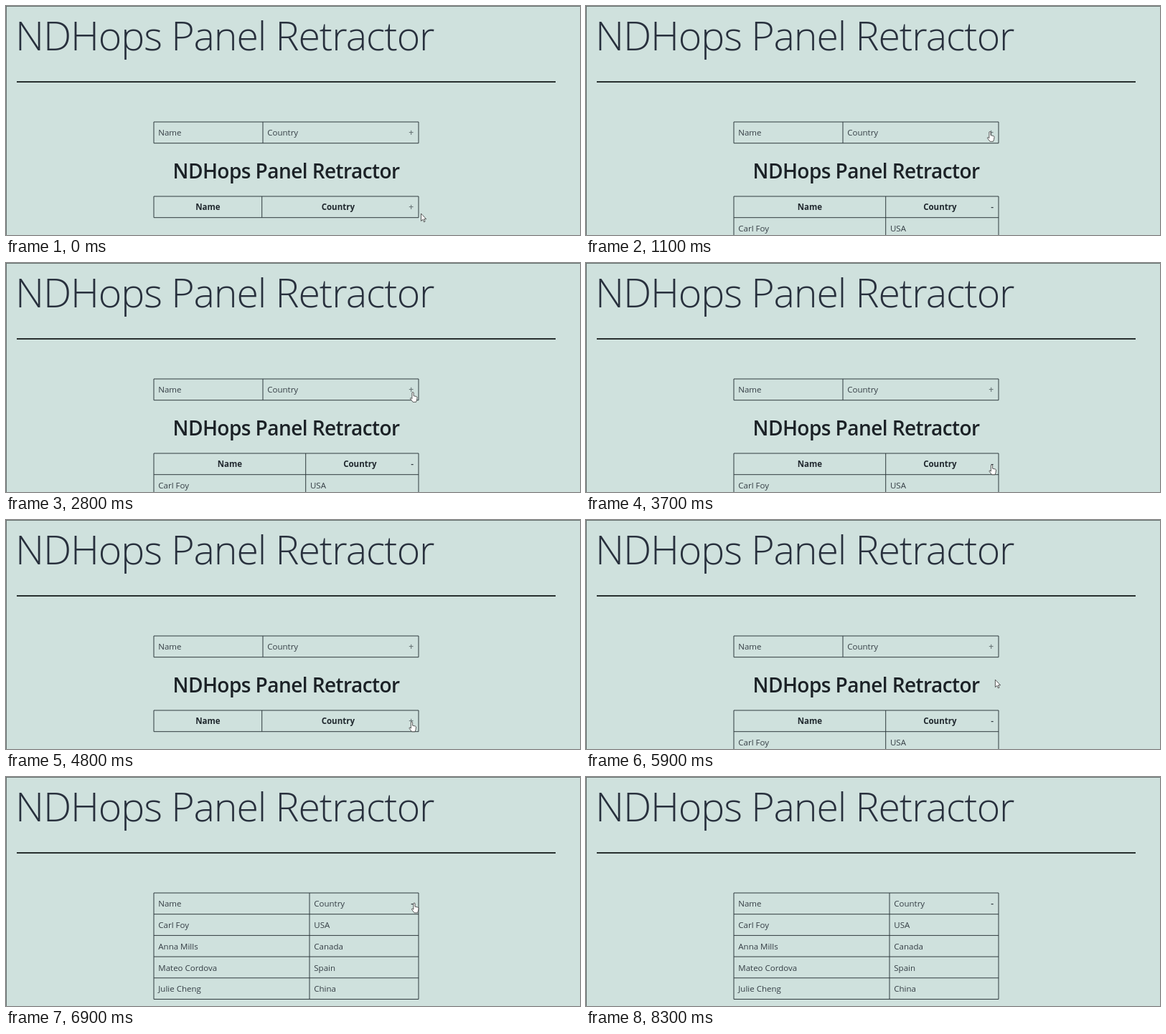
Animation, 800 px wide and 320 px high, one loop 9100 ms. Source, as an HTML page:

```html
<!DOCTYPE html>
<html lang="en">
<head>
<meta charset="utf-8">
<title>NDHops Panel Retractor</title>
<style>
  html, body { margin: 0; width: 100%; height: 100%; overflow: hidden; background: #cfe1dd; }
  svg { display: block; width: 800px; height: 320px; }
  text { font: 11.5px "Open Sans", "Noto Sans", sans-serif; fill: #343d44; }
  .title { font-size: 55.5px; font-weight: 300; letter-spacing: -.02em; fill: #28303d; }
  .heading { font-size: 28px; font-weight: 600; letter-spacing: -.02em; fill: #1b2126; text-anchor: middle; }
  .head { font-weight: 700; fill: #20282e; text-anchor: middle; }
  .sign { font-size: 12px; font-weight: 600; text-anchor: end; fill: #6a7678; }
  .minus { fill: #333c42; }
  .grid { fill: none; stroke: #2f3a3e; }
  .cursor { fill: #fff; stroke: #333; stroke-width: .8; stroke-linejoin: round; }
</style>
</head>
<body>
<svg viewBox="0 0 800 320">
  <path d="M0 .5H800M.5 0V320" stroke="#66716f"/>
  <text class="title" x="13" y="61.5">NDHops Panel Retractor</text>
  <path d="M15 106H766" stroke="#28302f" stroke-width="1.8"/>
  <g id="scene"></g>
</svg>
<script>
const LOOP = 9100, STEP = 100, EXIT = 8100;
const LEFT = 206, RIGHT = 575, ROW = 29.7;
const people = [["Carl Foy", "USA"], ["Anna Mills", "Canada"], ["Mateo Cordova", "Spain"], ["Julie Cheng", "China"]];

// pointer moves, each from where the last one ended
const start = { x: 578.5, y: 290 };
const moves = [
  { from: 0, to: 400, x: 565.5, y: 282 },
  { from: 500, to: 1100, x: 563, y: 175.5 },
  { from: 1100, to: 1800, x: 567, y: 180.5 },
  { from: 2800, to: 3700, x: 565.5, y: 282 },
  { from: 5600, to: 6500, x: 569, y: 176 },
  { from: 7800, to: 8000, x: 535, y: 91 }
];
const arrow = "M0 0V10.5L2.4 8.3 4 11.8 5.6 11.1 4 7.7H7.2Z";
const hand = "M-1.1 1.1a1.1 1.1 0 0 1 2.2 0V5.2l3.7.8q1.4.4 1.2 1.9l-.5 3.3-1 2.6H.1L-3.3 9.4q-.7-1.3.6-1.4l1.6 1.1z";

const within = (t, a, b) => t >= a && t < b;
const easeOut = k => k * (2 - k);
const label = (x, y, s, cls = "") => `<text class="${cls}" x="${x}" y="${y}">${s}</text>`;

function table(top, open, split, header) {
  const rows = [["Name", "Country"], ...(open ? people : [])];
  const bottom = top + ROW * rows.length;
  let grid = `M${LEFT} ${bottom}H${RIGHT}`;
  for (const x of [LEFT, split, RIGHT]) grid += `M${x} ${top}V${bottom}`;
  let texts = "";
  rows.forEach(([name, country], i) => {
    const y = top + ROW * i, base = y + 19.4;
    grid += `M${LEFT} ${y}H${RIGHT}`;
    texts += header && i === 0
      ? label((LEFT + split) / 2, base, name, "head") + label((split + RIGHT) / 2 - 3, base, country, "head")
      : label(LEFT + 6.3, base, name) + label(split + 6.3, base, country);
  });
  return `<path class="grid" d="${grid}"/>` + texts +
    label(568, top + 19.4, open ? "-" : "+", open ? "sign minus" : "sign");
}

function pointer(t) {
  if (t >= EXIT) return "";
  let { x, y } = start;
  for (const m of moves) {
    if (t < m.from) break;
    const k = easeOut(Math.min(1, (t - m.from) / (m.to - m.from)));
    x += (m.x - x) * k + 3 * Math.sin(Math.PI * k);
    y += (m.y - y) * k;
  }
  const over = x < RIGHT && (within(y, 167, 188) || within(y, 271, 292));
  return `<path class="cursor" transform="translate(${x} ${y})" d="${over ? hand : arrow}"/>`;
}

function draw(t) {
  const topOpen = within(t, 1400, 2800) || t >= 6800;
  const lowOpen = within(t, 400, 3800) || t >= 5400;
  const shift = topOpen ? ROW * people.length : 0;
  scene.innerHTML =
    table(162, topOpen, topOpen ? 423 : 358, false) +
    label(390.5, 241 + shift, "NDHops Panel Retractor", "heading") +
    table(266 + shift, lowOpen, lowOpen ? 417.7 : 356.7, true) +
    pointer(t);
}

const scene = document.getElementById("scene");
let last = -1;
function tick() {
  const t = Math.floor(performance.now() % LOOP / STEP) * STEP;
  if (t !== last) draw(last = t);
  requestAnimationFrame(tick);
}
tick();
</script>
</body>
</html>
```
